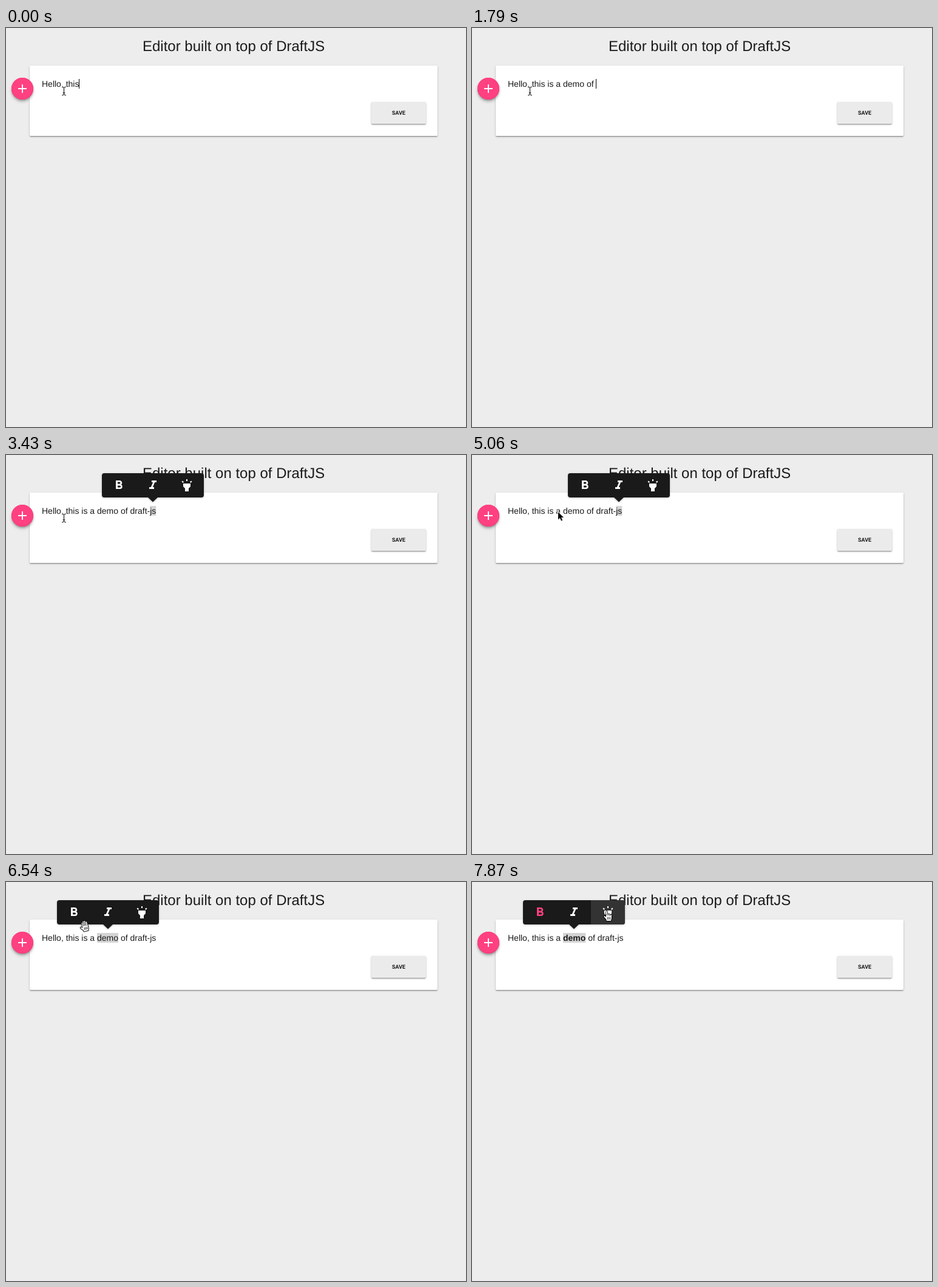
Recreate the animation shown at these times as an HTML page with a canvas. Size 758 px wide and 658 px high, loop 8 s.

```html
<!DOCTYPE html>
<html lang="en">
<head>
<meta charset="utf-8">
<title>Rich text editor demo</title>
<style>
html, body { margin: 0; width: 100%; height: 100%; overflow: hidden; background: #ededed; }
canvas { display: block; }
</style>
</head>
<body>
<canvas id="stage" width="758" height="658"></canvas>
<script>
const ctx = document.getElementById('stage').getContext('2d');
const LOOP = 8000, TICK = 148.6;
const SANS = '"Liberation Sans", Arial, sans-serif';
const BODY = '14px ' + SANS, BOLD = 'bold 14px ' + SANS;
const INK = '#1b1b1b', PINK = '#ff4081', DARK = '#1a1a1a';
const TEXT = 'Hello, this is a demo of draft-js';
const LEFT = 59, BASELINE = 97, WORD = [17, 21];

// Characters visible on each tick while typing
const TYPED = [11, 12, 13, 14, 15, 16, 18, 18, 20, 20, 22, 24, 25, 26, 27, 28, 29, 30, 31, 32, 33];

// Pointer waypoints: tick, x, y
const PATH = [
  [0, 95.5, 104], [26, 95.5, 104], [28, 75, 112], [30, 57, 98], [32, 118, 80],
  [33, 153, 90], [34, 142, 94], [36, 149, 94], [41, 149, 94], [44, 125, 66],
  [46, 108, 48], [48, 104, 47], [50, 105, 47], [53, 222, 48]
];

const ICONS = [
  'M15.6 10.8c1-.7 1.65-1.8 1.65-2.8 0-2.26-1.75-4-4-4H7v14h7c2.1 0 3.75-1.7 3.75-3.8 0-1.5-.86-2.8-2.15-3.4z' +
    'M10 6.5h3a1.5 1.5 0 0 1 0 3h-3zM13.5 15.5H10v-3h3.5a1.5 1.5 0 0 1 0 3z',
  'M10 4v3h2.2l-3.4 8H6v3h8v-3h-2.2l3.4-8H18V4z',
  'M6 14l3 3v5h6v-5l3-3V9H6zM11 2h2v3h-2zM3.5 5.9L4.9 4.5 7 6.6 5.6 8zM17 6.6l2.1-2.1 1.4 1.4L18.4 8z'
].map(d => new Path2D(d));
const PLUS = new Path2D('M20 100H34M27 93V107');
const ARROW = new Path2D('M0 0V12.4L2.9 9.7L5 14.6L7.1 13.7L5.1 9H9Z');
const BEAM = new Path2D('M-3-7Q0-7 0-5Q0-7 3-7M0-5V5M-3 7Q0 7 0 5Q0 7 3 7M-1.5 3H1.5');
const PALM = new Path2D('M-1 7V10L-3.4 8Q-5.4 8-4 10L-.5 14V16H6.8L8 12V8Z');

function text(str, x, y, font, color = INK) {
  ctx.font = font;
  ctx.fillStyle = color;
  ctx.fillText(str, x, y);
}

function widthOf(str, font = BODY) {
  ctx.font = font;
  return ctx.measureText(str).width;
}

const xAt = count => LEFT + widthOf(TEXT.slice(0, count));

function box(x, y, w, h, radius) {
  const p = new Path2D();
  p.roundRect(x, y, w, h, radius);
  return p;
}

// Each shadow is [offset y, blur, alpha]
function raise(path, color, shadows) {
  ctx.fillStyle = color;
  for (const [dy, blur, alpha] of shadows) {
    ctx.shadowOffsetY = dy;
    ctx.shadowBlur = blur;
    ctx.shadowColor = `rgba(0,0,0,${alpha})`;
    ctx.fill(path);
  }
  ctx.shadowColor = 'transparent';
}

function stroke(path, color, width) {
  ctx.strokeStyle = color;
  ctx.lineWidth = width;
  ctx.stroke(path);
}

function drawPage() {
  const shadow = [[2, 2, .14], [1, 1, .24], [1, 4, .12]];
  ctx.fillStyle = '#ededed';
  ctx.fillRect(0, 0, 758, 658);
  text('Editor built on top of DraftJS', 225, 38, '24px ' + SANS);
  raise(box(39, 62, 672, 116, 2), '#fff', shadow);
  raise(box(602, 122, 90, 36, 2), '#ebebeb', shadow);
  ctx.textAlign = 'center';
  text('SAVE', 647, 143, 'bold 9px Roboto, sans-serif');
  ctx.textAlign = 'left';
  raise(box(9, 82, 36, 36, 18), PINK, [[4, 5, .16], [2, 3, .24]]);
  stroke(PLUS, '#fff', 2);
}

function drawCaret(count) {
  ctx.fillStyle = '#000';
  ctx.fillRect(Math.round(xAt(count) - .2), 84, 1, 16);
}

function drawSelection(from, to, bold) {
  const x = xAt(from);
  ctx.fillStyle = '#d4d4d4';
  ctx.fillRect(x, 84, widthOf(TEXT.slice(from, to), bold ? BOLD : BODY), 16);
}

function drawText(count, bold) {
  if (!bold) return text(TEXT.slice(0, count), LEFT, BASELINE, BODY);
  const word = TEXT.slice(...WORD), x = xAt(WORD[0]);
  text(TEXT.slice(0, WORD[0]), LEFT, BASELINE, BODY);
  text(word, x, BASELINE, BOLD);
  text(TEXT.slice(WORD[1]), x + widthOf(word, BOLD), BASELINE, BODY);
}

function drawToolbar(x, hover, bold) {
  const panel = box(x, 30, 168, 40, 4);
  panel.addPath(new Path2D(`M${x + 76} 70h16l-8 7.5z`));
  raise(panel, DARK, [[1, 3, .25]]);
  if (hover >= 0) {
    ctx.save();
    ctx.clip(box(x, 30, 168, 40, 4));
    ctx.fillStyle = '#333';
    ctx.fillRect(x + hover * 56, 30, 56, 40);
    ctx.restore();
  }
  ICONS.forEach((icon, i) => {
    ctx.save();
    ctx.translate(x + 16 + i * 56, 38);
    ctx.fillStyle = bold && i === 0 ? PINK : '#fff';
    ctx.fill(icon, 'evenodd');
    ctx.restore();
  });
}

function drawHand(open) {
  const tops = open ? [2, 0, 0, 2] : [1, 5.5, 6, 7];
  if (open) ctx.rotate(-.25);
  stroke(PALM, '#000', 2);
  tops.forEach((top, i) => {
    const finger = new Path2D(`M${i * 2.3} ${top}V10`);
    stroke(finger, '#000', 3.6);
    stroke(finger, '#fff', 1.9);
  });
  ctx.fillStyle = '#fff';
  ctx.fill(PALM);
  stroke(new Path2D('M1.5 10V13.5M3.7 10V13.5M5.9 10V13.5'), '#000', .8);
}

function pointerAt(tick) {
  const next = PATH.findIndex(p => p[0] >= tick);
  if (next <= 0) return PATH[0].slice(1);
  const [t0, x0, y0] = PATH[next - 1], [t1, x1, y1] = PATH[next];
  const k = (tick - t0) / (t1 - t0);
  return [x0 + (x1 - x0) * k, y0 + (y1 - y0) * k];
}

function drawPointer(tick) {
  ctx.save();
  ctx.translate(...pointerAt(tick));
  ctx.lineCap = ctx.lineJoin = 'round';
  if (tick < 29) {
    stroke(BEAM, '#fff', 2.6);
    stroke(BEAM, '#000', 1);
  } else if (tick < 44) {
    stroke(ARROW, '#fff', 2);
    ctx.fillStyle = '#000';
    ctx.fill(ARROW);
  } else {
    drawHand(tick < 50);
  }
  ctx.restore();
}

function draw(now) {
  const tick = Math.min(53, Math.floor((now % LOOP + 6) / TICK));
  const count = TYPED[Math.min(tick, TYPED.length - 1)];
  const bold = tick >= 50;
  const endSelected = tick >= 23 && tick < 37;
  const wordSelected = tick >= 40;

  drawPage();
  if (endSelected) drawSelection(31, 33);
  if (wordSelected) drawSelection(...WORD, bold);
  drawText(count, bold);
  if (tick < 23) drawCaret(count);
  else if (!endSelected && !wordSelected) drawCaret(WORD[0]);

  if (endSelected) drawToolbar(158, -1, false);
  if (tick >= 41) drawToolbar(84, tick < 45 ? -1 : tick < 51 ? 0 : tick < 52 ? 1 : 2, bold);
  drawPointer(tick);
}

ctx.textRendering = 'geometricPrecision';
const start = performance.now();
function loop() {
  draw(performance.now() - start);
  requestAnimationFrame(loop);
}
loop();
</script>
</body>
</html>
```
